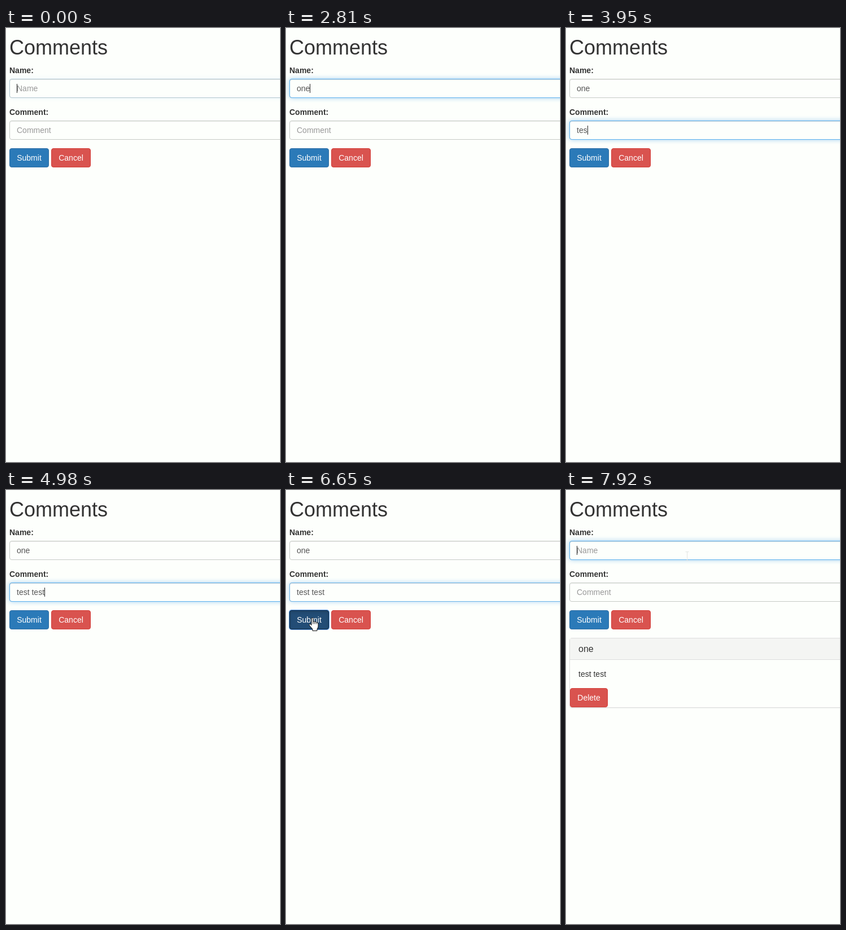
Animation of 485 by 769 pixels, one loop 8 s. Source, as an HTML page:

```html
<!DOCTYPE html>
<html lang="en">
<head>
<meta charset="utf-8">
<title>Comments</title>
<style>
html, body { margin: 0; width: 100%; height: 100%; overflow: hidden; }
body { position: relative; background: #fdfffc; color: #333; font: 14px/20px "Liberation Sans", Arial, sans-serif; }
body > *, #panel > * { position: absolute; box-sizing: border-box; margin: 0; white-space: pre; }
h1 { left: 6px; top: 15.4px; font-size: 36px; font-weight: 400; line-height: 1.1; }
.label { left: 6px; font-weight: 700; }
.field { left: 6px; width: 520px; height: 34px; padding: 6px 12px; border: 1px solid #c6cac6; border-radius: 4px;
  color: #555; box-shadow: inset 0 1px 1px rgba(0,0,0,.075); }
.field::after { content: ""; position: absolute; inset: -1px; border: 1px solid #5cb0ee; border-radius: 4px; opacity: var(--glow);
  box-shadow: inset 0 1px 1px rgba(0,0,0,.075), 0 0 8px rgba(102,175,233,.6); }
.empty { color: #999; }
.caret { position: absolute; top: 8px; width: 1px; height: 16px; background: #222; }
.btn { height: 34px; padding: 6px 0; border: 1px solid #d43f3a; border-radius: 4px; background: #d9534f; color: #fff; text-align: center; }
#submit { left: 6px; top: 213px; width: 70px; background: #2b7ab8; border-color: #2e6da4; }
#submit.hover { background: #286090; border-color: #204d74; }
#submit.focus { background: #286090; border-color: #122b40; box-shadow: 0 0 0 1px #5b9bea; }
#submit.press { background: #234d76; border-color: #122b40; box-shadow: 0 0 0 1px #5b9bea, inset 0 3px 5px rgba(0,0,0,.125); }
#panel { left: 6px; top: 262px; width: 520px; height: 124px; border: 1px solid #ddd; border-radius: 4px; box-shadow: 0 1px 1px rgba(0,0,0,.05); }
#head { left: 0; top: 0; width: 518px; height: 38px; padding: 10px 15px; border-bottom: 1px solid #ddd; background: #f4f5f3;
  font-size: 16px; line-height: 17.6px; }
svg { left: 0; top: 0; overflow: visible; }
</style>
</head>
<body>
<h1>Comments</h1>
<div class="label" style="top:65px">Name:</div>
<div class="field" id="name" style="top:90px"></div>
<div class="label" style="top:139px">Comment:</div>
<div class="field" id="comment" style="top:164px"></div>
<div class="btn" id="submit">Submit</div>
<div class="btn" style="left:80px;top:213px;width:70px">Cancel</div>
<div id="panel">
  <div id="head">one</div>
  <div style="left:15px;top:53px">test test</div>
  <div class="btn" style="left:0;top:88px;width:67px">Delete</div>
</div>
<svg width="1" height="1" stroke-linejoin="round">
  <path id="arrow" d="M0 0V16L4 12.5L6.5 18L9 17L6.6 11.5H12Z" fill="#fff" stroke="#000"/>
  <g id="hand" stroke="#111">
    <path d="M0 1.5Q0 0 1.5 0T3 1.5V7Q4.5 5.6 6 7.5Q7.7 6.3 9 8.3Q12 7.5 12 10.5V15Q12 17.5 10 20V23H2V20L-3.5 13.5Q-4.5 11.5-3 11T0 13Z" fill="#fff"/>
    <path d="M3 7V11M6 8V11M9 9V11" fill="none"/>
  </g>
  <path id="beam" d="M-3 -7.5H3M0 -7.5V7.5M-3 7.5H3" fill="none" stroke="#e3e6e3"/>
</svg>
<script>
const $ = id => document.getElementById(id);
const LOOP = 8000;

// Latest entry [time, ...values] that has begun
const at = (steps, t) => steps.findLast(s => s[0] <= t).slice(1);

const names = [[0, ""], [1980, "o"], [2230, "on"], [2480, "one"], [6900, ""]];
const comments = [[0, ""], [3700, "te"], [3950, "tes"], [4200, "test"], [4480, "test t"],
  [4730, "test tes"], [4980, "test test"], [6900, ""]];
const nameGlow = [[0, .2], [250, 1], [3080, .4], [3330, 0], [7670, .5], [7920, 1]];
const commentGlow = [[0, 0], [3080, .6], [3330, 1], [6650, .85], [6900, 0]];
const carets = [[0, "name"], [750, ""], [1200, "name"], [1730, ""], [1980, "name"], [3080, "comment"],
  [5550, ""], [6130, "comment"], [6650, ""], [7670, "name"]];
const buttons = [[0, ""], [6380, "hover"], [6650, "press"], [6900, "focus"], [7670, ""]];
const pointers = [[0, ""], [5880, "arrow", 247, 242], [6130, "arrow", 152, 237], [6380, "hand", 45, 226.5],
  [7150, "arrow", 128, 190], [7400, "beam", 214.5, 117]];

function field(id, hint, text, glow, caret) {
  const el = $(id);
  el.textContent = text || hint;
  el.classList.toggle("empty", !text);
  el.style.setProperty("--glow", glow);
  if (caret !== id) return;
  const bar = document.createElement("span");
  bar.className = "caret";
  if (!text) bar.style.left = "12px";
  el.append(bar);
}

function draw(now) {
  const t = now % LOOP;
  const [caret] = at(carets, t);
  field("name", "Name", at(names, t)[0], at(nameGlow, t)[0], caret);
  field("comment", "Comment", at(comments, t)[0], at(commentGlow, t)[0], caret);
  $("submit").className = "btn " + at(buttons, t)[0];
  $("panel").style.display = t >= 6900 ? "block" : "none";
  const [shape, x, y] = at(pointers, t);
  for (const id of ["arrow", "hand", "beam"]) {
    $(id).style.display = id === shape ? "inline" : "none";
    if (id === shape) $(id).setAttribute("transform", `translate(${x} ${y})`);
  }
}

const start = performance.now();
function tick() {
  draw(performance.now() - start);
  requestAnimationFrame(tick);
}
tick();
</script>
</body>
</html>
```
